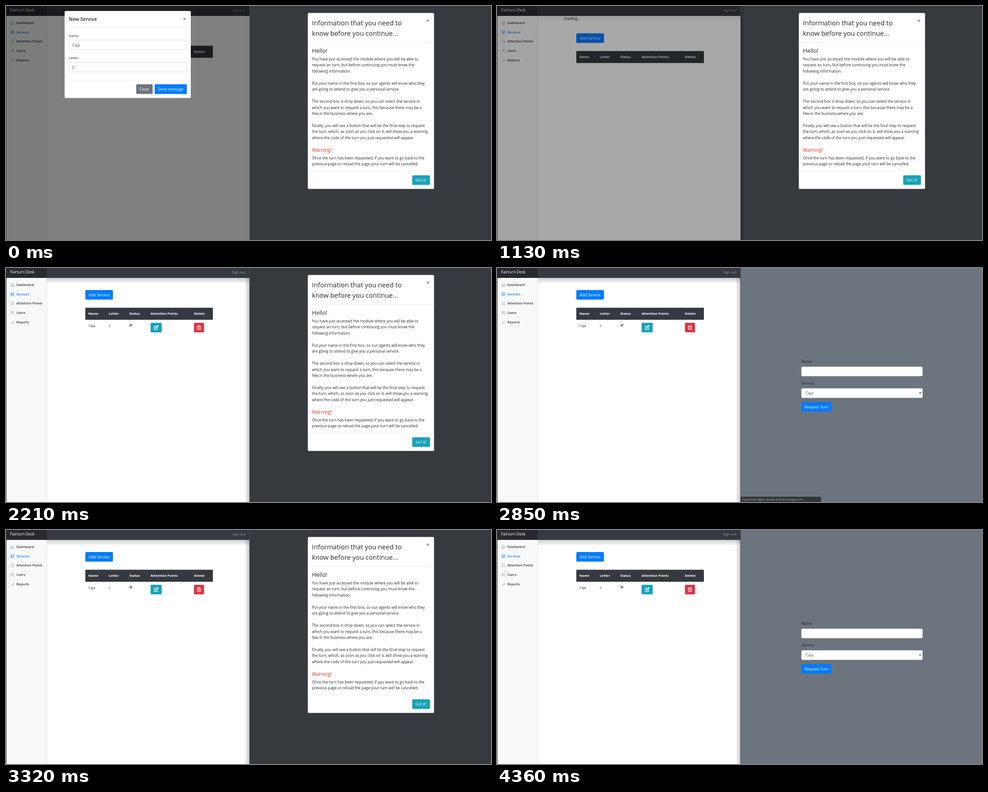
Recreate the animation shown at these times as an HTML page. Size 1076 by 520 pixels, loop 4690 ms.

```html
<!DOCTYPE html>
<html lang="en">
<head>
<meta charset="utf-8">
<title>Queue administration</title>
<style>
  html, body { margin: 0; width: 100%; height: 100%; overflow: hidden; background: #343a40; }
  svg { display: block; width: 1076px; height: 520px; }
  text { font: 8.5px "Open Sans", "Noto Sans", sans-serif; fill: #212529; white-space: pre; }

  .small text { font-size: 7.45px; }
  .body text { font-size: 8.42px; }
  .menu text { font-size: 7.35px; font-weight: 600; fill: #333; }
  .menu path, .menu circle { fill: none; stroke: #999; stroke-width: 2; stroke-linecap: round; stroke-linejoin: round; }
  .menu .active text { fill: #007bff; }
  .menu .active path { stroke: #007bff; }
  .head text { font-size: 7.33px; font-weight: 700; fill: #fff; }
  .title { font-weight: 600; }
  .cross { font-size: 13px; font-weight: 700; fill: #808080; }
  .on { fill: #fff; }
  .value { fill: #495057; }
  .field { fill: #fff; stroke: #ced4da; stroke-width: .8; }
  .rule { fill: #e4e7ea; }
  .ring { fill: none; stroke: #007bff; stroke-opacity: .5; stroke-width: 1.9; }
  .glyph { fill: none; stroke: #fff; stroke-width: 1.2; stroke-linejoin: round; }
  .status rect { fill: #35393d; }
  .status text { font-size: 6.4px; fill: #a9adb1; }

  .anim, .hard { animation: 4690ms linear infinite; }
  .hard { animation-timing-function: step-end; }

  /* Left window */
  .send { animation-name: send; }
  @keyframes send { 0%, 12.15% { fill: #007bff } 14.93%, 100% { fill: #0069d9 } }
  .send-ring { animation-name: send-ring; }
  @keyframes send-ring { 0%, 17.6% { opacity: 0 } 20.8%, 100% { opacity: 1 } }
  .service-fade { animation-name: service-fade; }
  @keyframes service-fade { 0%, 19.89% { opacity: 1 } 23.09%, 100% { opacity: 0 } }
  .service-slide { animation-name: service-slide; }
  @keyframes service-slide {
    0% { transform: none }
    19.89% { transform: none; animation-timing-function: ease-out }
    26.29%, 100% { transform: translateY(-28px) }
  }
  .left-dim { animation-name: left-dim; }
  @keyframes left-dim { 0%, 23.09% { opacity: .5 } 26.29%, 100% { opacity: 0 } }
  .nav-shade { animation-name: nav-shade; }
  @keyframes nav-shade { 0%, 23.09% { opacity: 0 } 26.29%, 100% { opacity: 1 } }
  .pushed { animation-name: pushed; }
  @keyframes pushed { 0% { transform: none } 20.04% { transform: translateY(11.7px) } 28.89%, 100% { transform: none } }
  .loading { animation-name: loading; }
  @keyframes loading { 0% { opacity: 0 } 20.04% { opacity: 1 } 28.89%, 100% { opacity: 0 } }
  .add-ring { animation-name: add-ring; }
  @keyframes add-ring { 0%, 26.23% { opacity: 0 } 28.99%, 34.96% { opacity: 1 } 34.97%, 100% { opacity: 0 } }
  .row { animation-name: row; }
  @keyframes row { 0% { opacity: 0 } 34.97%, 100% { opacity: 1 } }
  .icons { animation-name: icons; }
  @keyframes icons { 0% { opacity: 0 } 37.1%, 100% { opacity: 1 } }
  .left-status { animation-name: left-status; }
  @keyframes left-status { 0%, 29.95% { opacity: 0 } 29.96%, 43% { opacity: 1 } 46.9%, 100% { opacity: 0 } }

  /* The focused window casts its shadow on the other */
  .shade-left { animation-name: shade-left; }
  @keyframes shade-left { 0% { opacity: 0 } 43.07%, 100% { opacity: 1 } }
  .shade-right { animation-name: shade-right; }
  @keyframes shade-right { 0% { opacity: 0 } 17.9% { opacity: 1 } 43.07%, 100% { opacity: 0 } }

  /* Right window */
  .right-dim { animation-name: right-dim; }
  @keyframes right-dim {
    0%, 60.12% { opacity: .5 }
    60.13%, 61.13% { opacity: 0 }
    64.33%, 89.55% { opacity: .5 }
    92.75%, 100% { opacity: 0 }
  }
  .info-fade { animation-name: info-fade; }
  @keyframes info-fade {
    0%, 60.12% { opacity: 1 }
    60.13%, 64.39% { opacity: 0 }
    67.59%, 85.29% { opacity: 1 }
    88.49%, 100% { opacity: 0 }
  }
  .info-slide { animation-name: info-slide; }
  @keyframes info-slide {
    0%, 60.12% { transform: none }
    60.13% { transform: translateY(-28px) }
    64.39% { transform: translateY(-28px); animation-timing-function: ease-out }
    70.7% { transform: none }
    85.29% { transform: none; animation-timing-function: ease-out }
    91.68%, 100% { transform: translateY(-28px) }
  }
  .got { animation-name: got; }
  @keyframes got { 0%, 82% { fill: #17a2b8 } 85.2%, 100% { fill: #138496 } }
  .got-ring { stroke: #17a2b8; animation-name: got-ring; }
  @keyframes got-ring { 0%, 83% { opacity: 0 } 86.2%, 100% { opacity: 1 } }
  .right-status { animation-name: right-status; }
  @keyframes right-status { 0% { opacity: 0 } 59.06% { opacity: 1 } 70.47%, 100% { opacity: 0 } }
</style>
</head>
<body>
<svg viewBox="0 0 1076 520">
  <defs>
    <linearGradient id="down" x2="0" y2="1">
      <stop stop-opacity=".2"/><stop offset="1" stop-opacity="0"/>
    </linearGradient>
    <linearGradient id="toRight">
      <stop stop-opacity=".3"/><stop offset="1" stop-opacity="0"/>
    </linearGradient>
    <linearGradient id="toLeft" x1="1" x2="0">
      <stop stop-opacity=".22"/><stop offset="1" stop-opacity="0"/>
    </linearGradient>
    <clipPath id="leftWindow"><path d="M0 0H540V520H0z"/></clipPath>
  </defs>

  <g clip-path="url(#leftWindow)">
    <rect width="540" height="520" fill="#fff"/>
    <rect x="90" y="22" width="450" height="13" fill="url(#down)" class="anim nav-shade"/>
    <rect width="90" height="520" fill="#f8f9fa"/>
    <rect x="90" y="22" width="1" height="498" fill="#dfe1e3"/>
    <rect width="540" height="22" fill="#343a40"/>
    <rect width="90" height="22" fill="#272b30"/>
    <text x="9" y="11.9" class="on" style="font-size:8.68px">Fairturn Desk</text>
    <text x="502" y="11.8" style="font-size:7.7px;fill:#9a9da0">Sign out</text>

    <g class="menu">
      <g transform="translate(9.5 37.3)">
        <g transform="translate(0 -4.5) scale(.375)"><path d="M3 9l9-7 9 7v11a2 2 0 0 1-2 2H5a2 2 0 0 1-2-2zM9 22V12h6v10"/></g>
        <text x="13.5" y="2.5">Dashboard</text>
      </g>
      <g transform="translate(9.5 58.1)" class="active">
        <g transform="translate(0 -4.5) scale(.375)"><path d="M12 2 2 7l10 5 10-5zM2 17l10 5 10-5M2 12l10 5 10-5"/></g>
        <text x="13.5" y="2.5">Services</text>
      </g>
      <g transform="translate(9.5 78.9)">
        <g transform="translate(0 -4.5) scale(.375)"><path d="M19 21l-7-5-7 5V5a2 2 0 0 1 2-2h10a2 2 0 0 1 2 2z"/></g>
        <text x="13.5" y="2.5">Attention Points</text>
      </g>
      <g transform="translate(9.5 99.7)">
        <g transform="translate(0 -4.5) scale(.375)"><path d="M17 21v-2a4 4 0 0 0-4-4H5a4 4 0 0 0-4 4v2M23 21v-2a4 4 0 0 0-3-3.87M16 3.13a4 4 0 0 1 0 7.75"/><circle cx="9" cy="7" r="4"/></g>
        <text x="13.5" y="2.5">Users</text>
      </g>
      <g transform="translate(9.5 120.5)">
        <g transform="translate(0 -4.5) scale(.375)"><path d="M12 20V10M18 20V4M6 20v-4"/></g>
        <text x="13.5" y="2.5">Reports</text>
      </g>
    </g>

    <text x="149" y="31" class="hard loading">loading...</text>
    <g class="hard pushed">
      <rect x="176" y="49" width="61.3" height="21.3" rx="2.2" fill="#007bff"/>
      <rect x="175.1" y="48.1" width="63.1" height="23.1" rx="3" class="ring anim add-ring"/>
      <text x="183.2" y="62.8" class="on" style="font-size:8.6px">Add Service</text>
      <g class="head">
        <rect x="176" y="88.3" width="283" height="26.7" fill="#343a40"/>
        <text x="182.8" y="104.3">Name</text>
        <text x="228" y="104.3">Letter</text>
        <text x="273.5" y="104.3">Status</text>
        <text x="320.8" y="104.3">Attention Points</text>
        <text x="417" y="104.3">Delete</text>
      </g>
      <g class="small hard row">
        <text x="182.8" y="130.9">Caja</text>
        <text x="228" y="130.9">C</text>
        <rect x="273.9" y="123.9" width="6.2" height="6.2" rx=".6" fill="#fff" stroke="#8a8a8a" stroke-width=".8"/>
        <path d="M275.2 127l1.4 1.5 2.5-3.3" fill="none" stroke="#222" stroke-width="1.3"/>
        <rect x="320.8" y="121.8" width="24.7" height="21.3" rx="2.2" fill="#17a2b8"/>
        <rect x="417" y="121.8" width="22.4" height="21.3" rx="2.2" fill="#dc3545"/>
        <g class="glyph hard icons">
          <path d="M334 129h-5.2v7.6h7.6v-3.4M331.6 133.8l.4-1.9 4.6-4.4 1.5 1.5-4.6 4.5z"/>
          <path d="M424.7 129.9h6.8v6.9h-6.8zM423.7 129h8.8M426.6 128.5v-.8h3v.8M427 131.5v3.8M429.2 131.5v3.8" stroke-width="1"/>
        </g>
      </g>
    </g>

    <rect x="529" y="22" width="11" height="498" fill="url(#toLeft)" class="hard shade-left"/>
    <g class="status anim left-status">
      <rect y="508.7" width="179.5" height="12" rx="1.5"/>
      <text x="3" y="517">Esperando digital-queue-404.herokuapp.com...</text>
    </g>
    <rect width="540" height="520" class="anim left-dim"/>
    <rect width="1" height="520" fill="#2b2d30"/>

    <g class="anim service-fade">
      <g class="anim service-slide">
        <rect x="130" y="11" width="280" height="193.5" rx="2.6" fill="#fff"/>
        <text x="139.3" y="33" class="title" style="font-size:10.65px">New Service</text>
        <text x="392.4" y="32.8" class="cross">×</text>
        <rect x="130.5" y="46" width="279.4" height=".8" class="rule"/>
        <g class="small">
          <text x="139.3" y="68.6">Name:</text>
          <text x="139.3" y="118.4">Letter:</text>
        </g>
        <rect x="139.6" y="75.6" width="261.4" height="20.8" rx="2.2" class="field"/>
        <rect x="139.6" y="125.5" width="261.4" height="20.8" rx="2.2" class="field"/>
        <text x="146.8" y="89.6" class="value">Caja</text>
        <text x="146.8" y="139.5" class="value">C</text>
        <rect x="130.5" y="164.4" width="279.4" height=".8" class="rule"/>
        <rect x="288.8" y="174" width="36.6" height="21.4" rx="2.2" fill="#6c757d"/>
        <text x="296" y="187.9" class="on">Close</text>
        <rect x="329.8" y="174" width="71.4" height="21.4" rx="2.2" class="anim send"/>
        <rect x="328.9" y="173.1" width="73.2" height="23.2" rx="3" class="ring anim send-ring"/>
        <text x="336.8" y="187.9" class="on">Send message</text>
      </g>
    </g>
  </g>

  <g>
    <rect x="540" width="536" height="520" fill="#6c757d"/>
    <text x="675" y="211.1">Name</text>
    <rect x="675.4" y="219.4" width="268.6" height="20.8" rx="2.2" class="field"/>
    <text x="675" y="259.4">Service</text>
    <rect x="675.4" y="267.6" width="268.6" height="20.8" rx="2.2" class="field"/>
    <text x="684.6" y="281.4" class="value">Caja</text>
    <path d="M936.8 276.5h3.8l-1.9 3.4z" fill="#343a40"/>
    <rect x="675" y="297.8" width="67" height="21.4" rx="2.2" fill="#007bff"/>
    <text x="682.3" y="311.7" class="on">Request Turn</text>

    <rect x="540" width="536" height="520" class="anim right-dim"/>
    <rect x="540" width="8" height="520" fill="url(#toRight)" class="hard shade-right"/>
    <rect x="540" width="1" height="520" fill="#484c50"/>

    <g class="anim info-fade">
      <g class="anim info-slide">
        <rect x="669.6" y="15.6" width="280" height="391" rx="2.6" fill="#fff"/>
        <g class="title">
          <text x="678.8" y="42.6" style="font-size:14.75px">Information that you need to</text>
          <text x="678.8" y="66.2" style="font-size:14.75px">know before you continue...</text>
          <text x="678.8" y="103.8" style="font-size:12.8px">Hello!</text>
          <text x="678.8" y="324.3" style="font-size:10.55px;fill:#e02417">Warning!</text>
        </g>
        <text x="932" y="37.2" class="cross">×</text>
        <rect x="670" y="80.8" width="279.2" height=".8" class="rule"/>
        <g class="body">
          <text x="678.8" y="120.8">You have just accessed the module where you will be able to</text>
          <text x="678.8" y="134.3">request an turn, but before continuing you must know the</text>
          <text x="678.8" y="147.7">following information.</text>
          <text x="678.8" y="174.6">Put your name in the first box, so our agents will know who they</text>
          <text x="678.8" y="188.1">are going to attend to give you a personal service.</text>
          <text x="678.8" y="215">The second box is drop down, so you can select the service in</text>
          <text x="678.8" y="228.5">which you want to request a turn, this because there may be a</text>
          <text x="678.8" y="241.9">few in the business where you are.</text>
          <text x="678.8" y="268.9">Finally, you will see a button that will be the final step to request</text>
          <text x="678.8" y="282.4">the turn, which, as soon as you click on it, will show you a warning</text>
          <text x="678.8" y="295.8">where the code of the turn you just requested will appear.</text>
          <text x="678.8" y="340.9">Once the turn has been requested, if you want to go back to the</text>
          <text x="678.8" y="354.3">previous page or reload the page your turn will be cancelled.</text>
        </g>
        <rect x="670" y="366.3" width="279.2" height=".8" class="rule"/>
        <rect x="901.2" y="376.2" width="39.4" height="21.4" rx="2.2" class="anim got"/>
        <rect x="900.3" y="375.3" width="41.2" height="23.2" rx="3" class="ring anim got-ring"/>
        <text x="908.4" y="390.2" class="on">Got it!</text>
      </g>
    </g>

    <g class="status hard right-status">
      <rect x="540.5" y="508.2" width="178.3" height="12.5" rx="1.5" style="fill:#313539"/>
      <text x="543.5" y="516.7">Esperando digital-queue-404.herokuapp.com...</text>
    </g>
  </g>
</svg>
</body>
</html>
```
